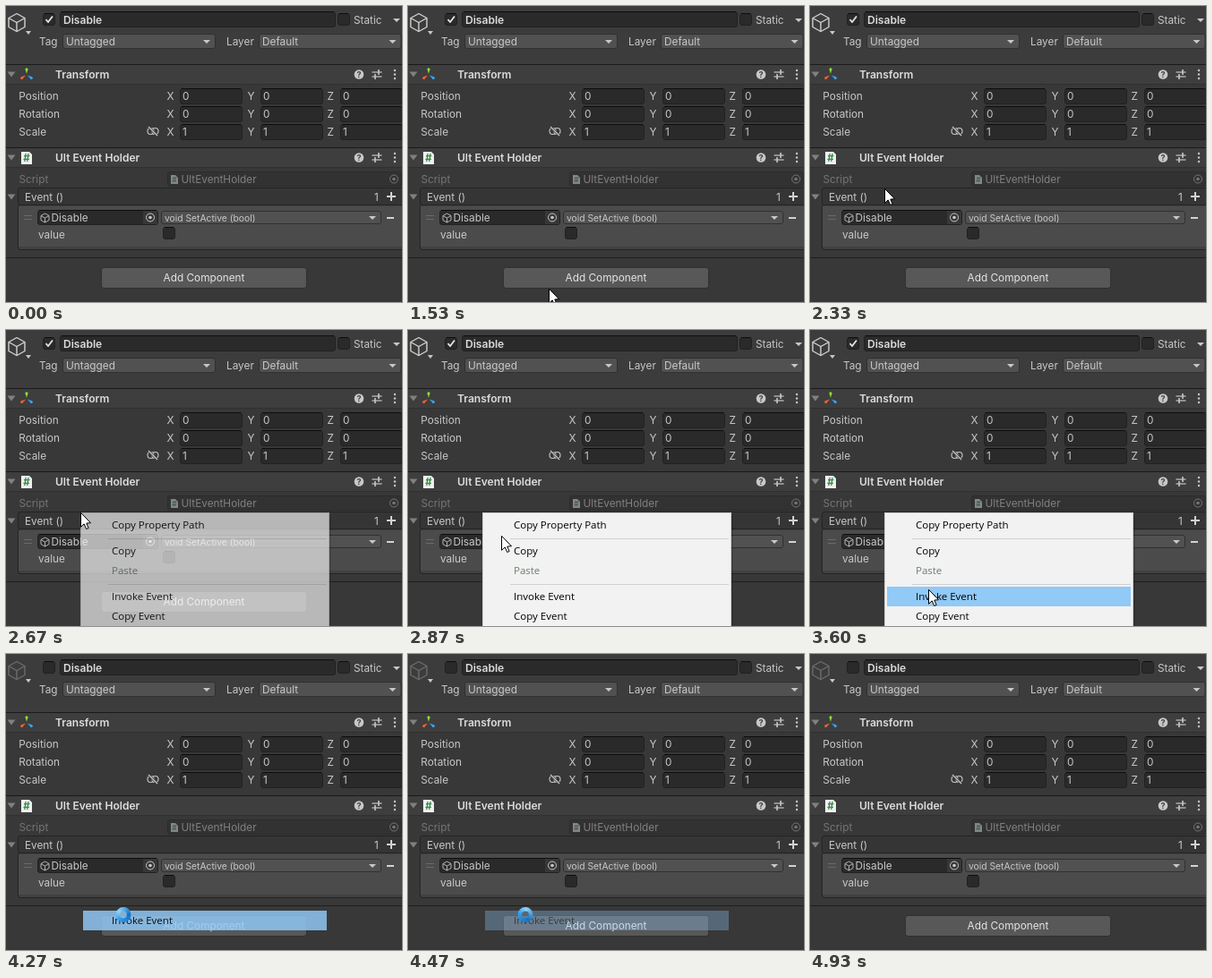
An HTML page with a canvas that plays this animation: 442 by 331 pixels, repeating every 6.74 s.

```html
<!DOCTYPE html>
<html lang="en">
<head>
<meta charset="utf-8">
<title>Inspector</title>
<style>
html, body { margin: 0; width: 100%; height: 100%; overflow: hidden; background: #383838; }
canvas { display: block; width: 442px; height: 331px; }
</style>
</head>
<body>
<canvas id="stage"></canvas>
<script>
const W = 442, H = 331, LOOP = 6740, STEP = 200 / 3;
const dpr = window.devicePixelRatio || 1;

function setup(canvas) {
  canvas.width = W * dpr;
  canvas.height = H * dpr;
  const c = canvas.getContext('2d');
  c.scale(dpr, dpr);
  return c;
}

const main = setup(document.getElementById('stage'));
const layer = setup(document.createElement('canvas'));
let ctx = main;

const UI = 'Inter, Roboto, sans-serif';
const MENU = '"Open Sans", "Noto Sans", sans-serif';
const INK = '#c8c8c8';

// Paints on a separate layer, then blends it as one sheet
function blend(alpha, paint) {
  layer.clearRect(0, 0, W, H);
  ctx = layer;
  paint();
  ctx = main;
  ctx.globalAlpha = alpha;
  ctx.drawImage(layer.canvas, 0, 0, W, H);
  ctx.globalAlpha = 1;
}

function rect(x, y, w, h, color) {
  ctx.fillStyle = color;
  ctx.fillRect(x, y, w, h);
}

function box(x, y, w, h, fill, edge, r = 2.5) {
  ctx.beginPath();
  ctx.roundRect(x + 0.5, y + 0.5, w - 1, h - 1, r);
  ctx.fillStyle = fill;
  ctx.fill();
  ctx.strokeStyle = edge;
  ctx.lineWidth = 1;
  ctx.stroke();
}

function text(str, x, base, { color = INK, size = 11.8, weight = 400, family = UI, align = 'left' } = {}) {
  ctx.font = `${weight} ${size}px ${family}`;
  ctx.textAlign = align;
  ctx.textBaseline = 'alphabetic';
  ctx.fillStyle = color;
  ctx.fillText(str, x, base);
}

const bold = (str, x, base) => text(str, x, base, { size: 12.05, weight: 600, color: '#dcdcdc' });

function path(points, close) {
  ctx.beginPath();
  points.forEach(([x, y], i) => i ? ctx.lineTo(x, y) : ctx.moveTo(x, y));
  if (close) ctx.closePath();
}

function poly(points, color) {
  path(points, true);
  ctx.fillStyle = color;
  ctx.fill();
}

function line(points, color, width = 1) {
  path(points);
  ctx.strokeStyle = color;
  ctx.lineWidth = width;
  ctx.stroke();
}

function disc(x, y, r, color) {
  ctx.beginPath();
  ctx.arc(x, y, r, 0, 7);
  ctx.fillStyle = color;
  ctx.fill();
}

function ring(x, y, r, color, width = 1) {
  ctx.beginPath();
  ctx.arc(x, y, r, 0, 7);
  ctx.strokeStyle = color;
  ctx.lineWidth = width;
  ctx.stroke();
}

function arrowDown(x, y, w, h, color = INK) {
  poly([[x - w / 2, y - h / 2], [x + w / 2, y - h / 2], [x, y + h / 2]], color);
}

const foldout = y => arrowDown(6, y, 9, 6, '#808080');

function field(x, y, w, h) {
  box(x, y, w, h, '#2a2a2a', '#212121');
  rect(x + 2, y, w - 4, 1, '#0d0d0d');
}

function popup(x, y, w, h, label, opts) {
  box(x, y, w, h, '#515151', '#303030');
  text(label, x + 4, y + h / 2 + 4, opts);
  arrowDown(x + w - 10, y + h / 2 + 0.5, 8, 4);
}

function cube(x, y, r, color, width) {
  const dx = r * 0.9;
  const top = y - r, up = y - r / 2, low = y + r / 2;
  ctx.lineJoin = 'round';
  line([[x, top], [x + dx, up], [x + dx, low], [x, y + r], [x - dx, low], [x - dx, up], [x, top]], color, width);
  line([[x - dx, up], [x, y], [x + dx, up]], color, width);
  line([[x, y], [x, y + r]], color, width);
}

function picker(x, y, color) {
  ring(x, y, 4.5, color);
  disc(x, y, 1.8, color);
}

function titleBar(y, label) {
  rect(0, y, W, 1, '#1a1a1a');
  rect(0, y + 1, W, 21, '#3e3e3e');
  rect(0, y + 22, W, 1, '#303030');
  const mid = y + 11.5;
  foldout(mid);
  bold(label, 55, mid + 4.5);
  disc(394, mid, 5.3, INK);
  text('?', 394, mid + 3.5, { size: 9, weight: 700, color: '#3e3e3e', align: 'center' });
  line([[408.5, mid - 2.5], [419.5, mid - 2.5]], INK, 1.2);
  line([[408.5, mid + 2.5], [419.5, mid + 2.5]], INK, 1.2);
  line([[416, mid - 5.5], [416, mid + 0.5]], INK, 1.6);
  line([[412, mid - 0.5], [412, mid + 5.5]], INK, 1.6);
  for (const d of [-4.5, 0, 4.5]) disc(434, mid + d, 1.2, INK);
}

function axisIcon(x, y) {
  const axes = [[0, -1, '#8be03c'], [-0.86, 0.55, '#f0603c'], [0.86, 0.55, '#3ca4f0']];
  for (const [dx, dy, color] of axes) {
    const ex = x + dx * 6.2, ey = y + dy * 6.2;
    poly([[x + dx, y + dy], [ex - dy * 1.4, ey + dx * 1.4], [ex + dy * 1.4, ey - dx * 1.4]], color);
    disc(ex, ey, 1.5, color);
  }
}

function linkIcon(x, y) {
  ctx.beginPath();
  ctx.roundRect(x - 6, y - 3.5, 7, 7, 3.5);
  ctx.roundRect(x - 1, y - 3.5, 7, 7, 3.5);
  ctx.strokeStyle = INK;
  ctx.lineWidth = 1.1;
  ctx.stroke();
  line([[x - 5, y - 5], [x + 5, y + 5]], '#383838', 2.6);
  line([[x - 5, y - 5], [x + 5, y + 5]], INK, 1.2);
}

function scriptIcon(x, y, w, h, paper, mark) {
  poly([[x, y], [x + w - 3, y], [x + w, y + 3], [x + w, y + h], [x, y + h]], paper);
  text('#', x + w / 2, y + h / 2 + w * 0.36, { size: w * 0.95, weight: 700, color: mark, align: 'center' });
}

function header(active) {
  rect(0, 0, W, 65, '#3c3c3c');
  cube(12, 18.5, 10, active ? '#d2d2d2' : '#6c6c6c', 1.4);
  arrowDown(25, 30, 6, 4);
  field(41, 8, 14, 14);
  if (active) line([[44.5, 15], [47, 18], [52, 11.5]], '#e6e6e6', 1.8);
  field(60, 6, 308, 18);
  bold('Disable', 64, 19.5);
  field(370, 8, 14, 14);
  text('Static', 388, 20);
  arrowDown(436, 16, 8, 4);
  text('Tag', 37, 44);
  popup(63, 31, 171, 17, 'Untagged');
  text('Layer', 246, 44);
  popup(282, 31, 159.5, 17, 'Default');
}

function transform() {
  titleBar(65, 'Transform');
  axisIcon(23, 77);
  ['Position', 'Rotation', 'Scale'].forEach((label, row) => {
    const y = 92 + row * 20;
    text(label, 14.3, y + 13);
    ['X', 'Y', 'Z'].forEach((axis, col) => {
      const x = Math.round(194 + col * 89.5);
      text(axis, x - 14.5, y + 13);
      field(x, y, 70, 18);
      text(row < 2 ? '0' : '1', x + 3, y + 13);
    });
  });
  linkIcon(164, 140);
}

function eventHolder() {
  titleBar(158, 'Ult Event Holder');
  scriptIcon(17, 163, 12, 14, '#f0f0f0', '#2f8a3e');

  text('Script', 14.5, 198, { color: '#757575' });
  box(180, 185, 262, 17, '#323232', '#2c2c2c');
  scriptIcon(184, 189, 8, 10, '#858585', '#3f5f45');
  text('UltEventHolder', 195.5, 198, { color: '#808080' });
  picker(433, 193.5, '#757575');

  box(13, 203, 432, 20, '#353535', '#242424');
  box(13, 222, 432, 51, '#414141', '#242424');
  rect(14, 224, W, 45, '#4b4b4b');
  foldout(213.5);
  text('Event ()', 21, 217.5);
  text('1', 411, 217.5);
  rect(425, 212, 10, 2, '#d2d2d2');
  rect(429, 208, 2, 10, '#d2d2d2');

  rect(20, 234, 9, 1, '#6a6a6a');
  rect(20, 238, 9, 1, '#6a6a6a');
  field(35, 228, 135, 17);
  rect(153, 229, 16, 15, '#373737');
  cube(43.5, 237, 5, '#b4b4b4', 1);
  text('Disable', 50.5, 241);
  picker(161, 236.5, INK);
  popup(173, 229, 246, 15, 'void SetActive (bool)', { size: 10.3 });
  rect(425, 236, 8, 2, '#d2d2d2');
  text('value', 36, 260);
  field(175, 247, 14, 14);
}

function scene(active) {
  rect(0, 0, W, H, '#383838');
  header(active);
  transform();
  eventHolder();
  rect(0, 281, W, 1, '#1f1f1f');
  box(106, 292, 230, 24, '#585858', '#303030', 3);
  text('Add Component', 221, 308, { align: 'center', color: '#e4e4e4' });
}

const menuText = (label, base, color = '#000') =>
  text(label, 118, base, { family: MENU, size: 11.5, color });

function highlight() {
  rect(86, 287, 272, 22, '#91c9f7');
}

function menu(hover) {
  rect(361, 208, 2, H, 'rgba(0,0,0,.12)');
  rect(83, 204, 278, H, '#cccccc');
  rect(84, 205, 276, H, '#f2f2f2');
  rect(114, 233, 244, 1, '#d0d0d0');
  rect(114, 284, 244, 1, '#d0d0d0');
  if (hover) highlight();
  menuText('Copy Property Path', 222);
  menuText('Copy', 251);
  menuText('Paste', 273, '#6d7d6d');
  menuText('Invoke Event', 302);
  menuText('Copy Event', 324);
}

function pickedItem() {
  highlight();
  menuText('Invoke Event', 302);
}

const ARROW = [[0, 0], [0, 16], [3.7, 12.6], [6.2, 18.2], [8.6, 17.2], [6.3, 11.8], [11, 11.4]];

function pointer(x, y) {
  ctx.lineJoin = 'miter';
  path(ARROW.map(([dx, dy]) => [x + 0.5 + dx, y + 0.3 + dy]), true);
  ctx.fillStyle = '#fff';
  ctx.fill();
  ctx.strokeStyle = '#000';
  ctx.lineWidth = 1;
  ctx.stroke();
}

function busy(x, y, turn) {
  const g = ctx.createConicGradient(turn, x, y);
  g.addColorStop(0, '#1272c8');
  g.addColorStop(0.35, '#2f9be8');
  g.addColorStop(0.6, '#8fd6fa');
  g.addColorStop(1, '#1272c8');
  ring(x, y, 6.2, g, 4.6);
}

// Pointer path: step, x, y
const PATH = [
  [23, 157, 316], [24, 117, 248], [25, 89, 198], [27, 89, 198], [31, 83, 203],
  [34, 83, 203], [35, 83, 204], [41, 83, 204], [43, 104, 230], [49, 130, 280],
  [50, 131, 287], [54, 132, 290], [72, 132, 290], [73, 132, 313]
];

function pointerAt(n) {
  let i = 0;
  while (i < PATH.length - 2 && PATH[i + 1][0] <= n) i++;
  const [a, ax, ay] = PATH[i], [b, bx, by] = PATH[i + 1];
  const k = Math.min(1, (n - a) / (b - a));
  return [Math.round(ax + (bx - ax) * k), Math.round(ay + (by - ay) * k)];
}

const MENU_ON = 39, HOVER = 50, CLICK = 64, READY = 72, GONE = 74;

function draw(t) {
  const n = Math.floor((t + 4) / STEP);
  scene(n < CLICK);
  if (n >= MENU_ON && n < CLICK) {
    blend(Math.min(1, (n - MENU_ON + 1) * 0.345), () => menu(n >= HOVER));
  }
  const fade = 0.83 * (1 - (n - CLICK) / 5);
  if (n >= CLICK && fade > 0) blend(fade, pickedItem);
  if (n >= CLICK && n < READY) busy(131, 291.5, Math.min(n - CLICK, 5) * 0.35);
  else if (n >= PATH[0][0] && n < GONE) pointer(...pointerAt(n));
}

const start = performance.now();
function tick() {
  draw((performance.now() - start) % LOOP);
  requestAnimationFrame(tick);
}
tick();
</script>
</body>
</html>
```
